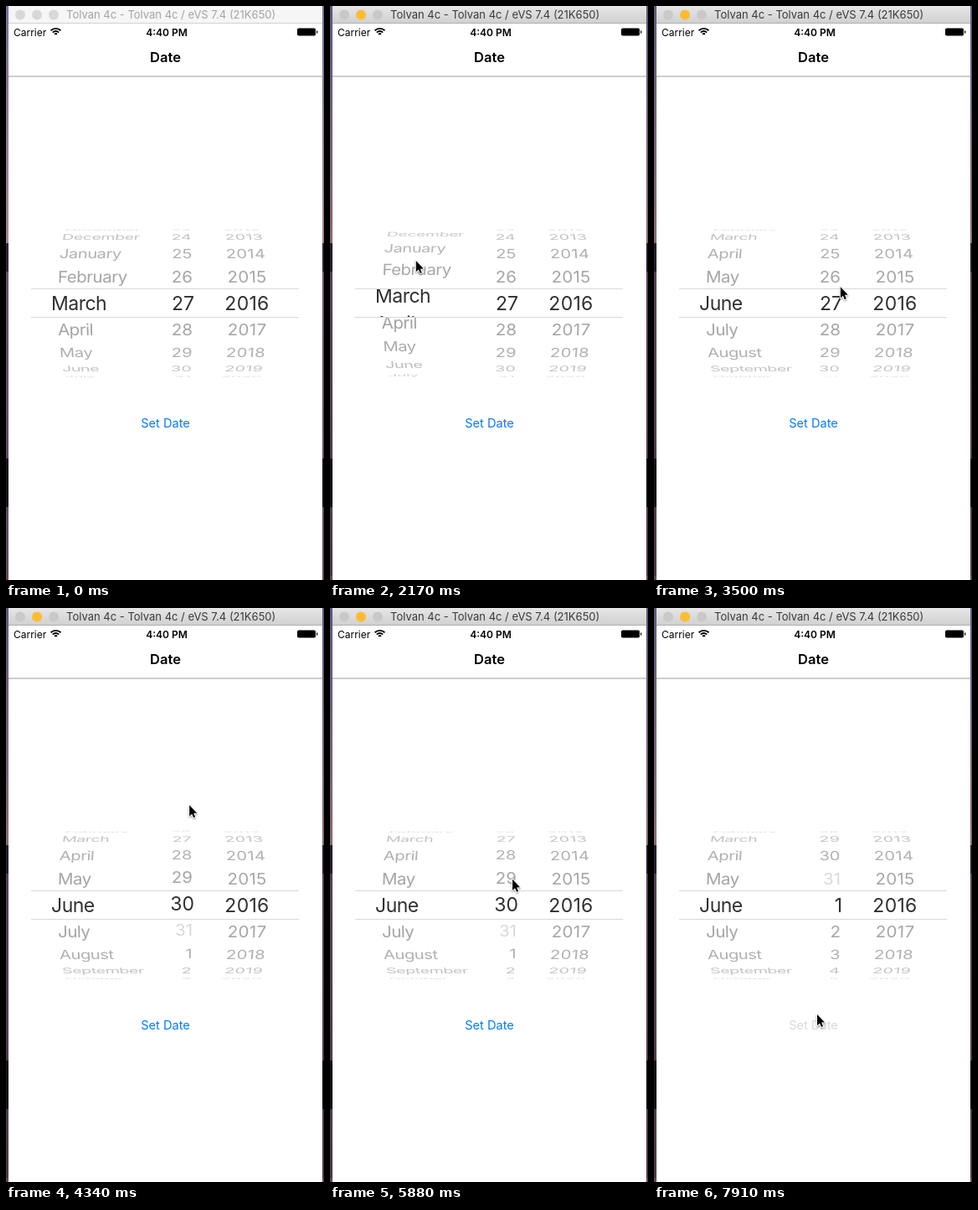
Recreate the animation shown at these times as an HTML page with a canvas. Size 380 by 685 pixels, loop 8000 ms.

```html
<!DOCTYPE html>
<html lang="en">
<head>
<meta charset="utf-8">
<title>Date picker</title>
<style>
html, body { margin: 0; width: 100%; height: 100%; overflow: hidden; background: #fff; }
canvas { display: block; width: 380px; height: 685px; }
</style>
</head>
<body>
<canvas id="stage" width="380" height="685"></canvas>
<script>
const ctx = document.getElementById('stage').getContext('2d');
const FAMILY = 'Inter, "Open Sans", sans-serif';
const LOOP = 8000, STEP = 70, LAST = 7910;
const MONTHS = ['January', 'February', 'March', 'April', 'May', 'June', 'July',
  'August', 'September', 'October', 'November', 'December'];

// Wheel geometry
const MID = 190, ROW_Y = 354.5, RADIUS = 88, ANGLE = 21 * Math.PI / 180;
const DEPTH = 0.08, FLAT_ROW = 33, BAND_TOP = 338, BAND_H = 33;

// Pointer moves: start, end, and the point reached
const ENTRY = { x: 172, y: 68 };
const MOVES = [
  [280, 420, 151, 261], [560, 1050, 115, 349], [1610, 2000, 104, 322],
  [2000, 2590, 98, 233], [2730, 3290, 223, 334], [3430, 3710, 222, 342],
  [3920, 4410, 219, 229], [4550, 4760, 218, 205], [5110, 5600, 219, 334],
  [5670, 6510, 213, 269], [6580, 6860, 208, 263], [6930, 7770, 195, 485]
];

// Drags: grab, release, time at rest, and the row it rests on
const MONTH_DRAGS = [[2000, 2590, 3290, 3]];
const DAY_DRAGS = [[3920, 5110, 5600, 3], [5670, 6580, 6860, 5]];
const SLOP = 9, DRAG_ROW = 32;

const mod = (n, m) => ((n % m) + m) % m;
const lerp = (a, b, u) => a + (b - a) * u;
const part = (t, from, to) => Math.min(1, Math.max(0, (t - from) / (to - from)));
const smooth = u => u * u * (3 - 2 * u);
const easeOut = u => 1 - (1 - u) ** 3;

function pointer(t) {
  let { x, y } = ENTRY;
  for (const [from, to, toX, toY] of MOVES) {
    const u = smooth(part(t, from, to));
    x = lerp(x, toX, u);
    y = lerp(y, toY, u);
  }
  return { x, y };
}

// The wheel follows the pointer while held, then settles on a row
function spin(drags, t) {
  let pos = 0;
  for (const [grab, release, settle, row] of drags) {
    if (t < grab) break;
    const pull = pointer(grab).y - pointer(Math.min(t, release)).y - SLOP;
    pos = lerp(pos + Math.max(0, pull) / DRAG_ROW, row, easeOut(part(t, release, settle)));
  }
  return pos;
}

function text(str, x, y, size, color, align = 'left', weight = 400, spacing = 0) {
  ctx.font = `${weight} ${size}px ${FAMILY}`;
  ctx.letterSpacing = spacing + 'px';
  ctx.textAlign = align;
  ctx.fillStyle = color;
  ctx.fillText(str, x, y);
}

function rect(x, y, w, h, color) {
  ctx.fillStyle = color;
  ctx.fillRect(x, y, w, h);
}

function shade(x, y, w, h, top, bottom) {
  const g = ctx.createLinearGradient(0, y, 0, y + h);
  g.addColorStop(0, top);
  g.addColorStop(1, bottom);
  rect(x, y, w, h, g);
}

function desktop(active) {
  shade(0, 0, 380, 283, '#76709c', '#a9858f');
  shade(0, 283, 380, 402, '#6a546c', '#5f4a58');
  rect(0, 283, 380, 34, '#30263a');
  rect(0, 540, 380, 58, '#19141d');
  if (active) rect(0, 0, 380, 680, 'rgba(0,0,0,.2)');
  rect(3, 0, 375, 685, '#fff');
}

function titleBar(active) {
  if (active) shade(3, 0, 375, 20, '#e6e6e6', '#d1d1d1');
  else rect(3, 0, 375, 20, '#f6f6f6');
  rect(3, 20, 375, 1, active ? '#afafaf' : '#d2d2d2');
  for (let i = 0; i < 3; i++) {
    ctx.beginPath();
    ctx.arc(17 + 20 * i, 10.5, 6, 0, 7);
    ctx.fillStyle = !active ? '#d8d8d8' : i === 1 ? '#fdbc30' : '#c9c9c9';
    ctx.fill();
  }
  text('Tolvan 4c - Tolvan 4c / eVS 7.4 (21K650)', 72, 15, 13, active ? '#3a3a3a' : '#a3a3a3');
}

function statusBar() {
  text('Carrier', 9, 35.5, 12, '#000');
  text('4:40 PM', 192, 35.5, 12, '#000', 'center', 600);
  ctx.strokeStyle = ctx.fillStyle = '#000';
  ctx.lineWidth = 1.8;
  for (let r = 2; r < 9; r += 3.2) {
    ctx.beginPath();
    ctx.arc(59.5, 35.2, r, -Math.PI * 0.75, -Math.PI * 0.25);
    ctx.stroke();
  }
  ctx.beginPath();
  ctx.roundRect(348, 26.5, 22, 9, 1.8);
  ctx.fill();
  rect(371, 29.5, 1.3, 3, '#000');
}

// Draws one picker column: the curved rows, then the flat magnified row
function wheel(col, pos) {
  const { label, off = () => false, align, spacing = 0 } = col;
  const near = Math.round(pos);
  for (let i = near - 5; i <= near + 5; i++) {
    const a = (i - pos) * ANGLE;
    if (Math.abs(a) >= Math.PI / 2) continue;
    const c = Math.cos(a), s = 1 - DEPTH * (0.934 - c);
    ctx.save();
    ctx.transform(s, 0, -col.mid * DEPTH * Math.sin(a) / RADIUS, c,
      MID, ROW_Y + RADIUS * Math.sin(a));
    ctx.globalAlpha = (0.36 + 0.64 * c) * (off(i) ? 0.42 : 1);
    text(label(i), col.side - MID, 7.4, 20.5, '#a1a1a1', align, 400, spacing);
    ctx.restore();
  }
  ctx.save();
  ctx.beginPath();
  ctx.rect(col.left, BAND_TOP, col.width, BAND_H);
  ctx.clip();
  rect(col.left, BAND_TOP, col.width, BAND_H, '#fff');
  for (let i = near - 1; i <= near + 1; i++) {
    text(label(i), col.front, ROW_Y + (i - pos) * FLAT_ROW + 8.5, 23,
      off(i) ? '#adadad' : '#303030', align, 400, spacing);
  }
  ctx.restore();
}

function picker(t) {
  const june = t >= 3290;
  const day = i => mod(26 + i, 31) + 1;
  wheel({ left: 40, width: 140, mid: -85, side: 62, front: 54, align: 'left',
    spacing: -0.5, label: i => MONTHS[mod(2 + i, 12)] }, spin(MONTH_DRAGS, t));
  wheel({ left: 185, width: 55, mid: 20, side: 223, front: 225, align: 'right',
    label: day, off: i => june && day(i) === 31 }, spin(DAY_DRAGS, t));
  wheel({ left: 250, width: 90, mid: 98, side: 288, front: 288, align: 'center',
    spacing: 0.3, label: i => 2016 + i }, 0);
  rect(30, 337, 320, 1, '#d9d9d9');
  rect(30, 371, 320, 1, '#d9d9d9');
}

function cursor({ x, y }) {
  ctx.save();
  ctx.translate(x, y);
  const arrow = new Path2D('M0 0V13.2L3 10.4L5 15L7 14.1L5.1 9.6L9 9.4Z');
  ctx.lineJoin = 'round';
  ctx.lineWidth = 2;
  ctx.strokeStyle = '#fff';
  ctx.shadowColor = 'rgba(0,0,0,.4)';
  ctx.shadowBlur = 2;
  ctx.shadowOffsetY = 1;
  ctx.stroke(arrow);
  ctx.shadowColor = 'transparent';
  ctx.fillStyle = '#000';
  ctx.fill(arrow);
  ctx.restore();
}

function draw(t) {
  const active = t >= 1190;
  desktop(active);
  titleBar(active);
  statusBar();
  text('Date', 190.5, 67, 16.5, '#000', 'center', 600);
  rect(3, 83, 375, 2, '#cdcdcd');
  picker(t);
  const ink = t >= 7910 ? '#d9d9d9' : t >= 7840 ? '#a5c8ec' : '#007aff';
  text('Set Date', 190.5, 503, 14.6, ink, 'center');
  if (t >= 280) cursor(pointer(t));
}

const start = performance.now();
function tick() {
  const t = (performance.now() - start) % LOOP;
  draw(Math.min(LAST, Math.floor(t / STEP) * STEP));
  requestAnimationFrame(tick);
}
tick();
</script>
</body>
</html>
```
